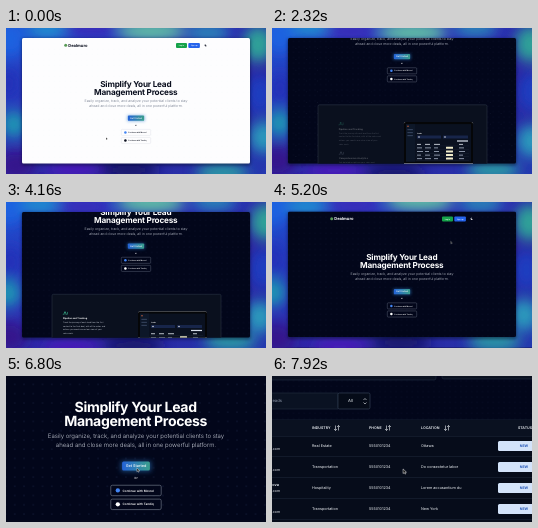
These frames come from a looping animation (260 by 146 pixels, 8 s). An HTML page:

```html
<!DOCTYPE html>
<html lang="en">
<head>
<meta charset="utf-8">
<title>Lead management demo</title>
<style>
html, body { margin: 0; width: 100%; height: 100%; overflow: hidden; background: #15155f; }
svg { display: block; width: 100vw; height: 100vh; font-family: Inter, "Liberation Sans", sans-serif; text-rendering: geometricPrecision; }
#stage { --bg: #fdfdfe; --fg: #0a0f1e; --muted: #677184; --line: #dfe4ec; --card: #f8fafc; --dot: #e3e7ee; --edge: #d5dae2; }
#stage.dark { --bg: #02061a; --fg: #ffffff; --muted: #c6cbd6; --line: #303a4b; --card: #0a101e; --dot: #26335a; --edge: #7d8696; }
</style>
</head>
<body>
<svg id="stage" viewBox="0 0 260 146" preserveAspectRatio="none">
  <defs>
    <linearGradient id="sky" x1="0" y1="0" x2="1" y2="1">
      <stop offset="0" stop-color="#1f4fcf"/>
      <stop offset=".35" stop-color="#2b32b8"/>
      <stop offset=".65" stop-color="#2c249f"/>
      <stop offset="1" stop-color="#2438b0"/>
    </linearGradient>
    <linearGradient id="cta">
      <stop offset="0" stop-color="#2563d8"/>
      <stop offset="1" stop-color="#3a9f8c"/>
    </linearGradient>
    <linearGradient id="metal" x1="0" y1="0" x2="0" y2="1">
      <stop offset="0" stop-color="#f4f5f7"/>
      <stop offset="1" stop-color="#cfd2d8"/>
    </linearGradient>
    <filter id="blur" x="-80%" y="-80%" width="260%" height="260%"><feGaussianBlur stdDeviation="6.5"/></filter>
    <filter id="soft" x="-50%" y="-50%" width="200%" height="200%"><feGaussianBlur stdDeviation="1.5"/></filter>
    <pattern id="dots" x="2.6" y="2" width="5.4" height="5.4" patternUnits="userSpaceOnUse">
      <circle cx="2.7" cy="2.7" r=".28" fill="var(--dot)"/>
    </pattern>
    <pattern id="sparks" x="18.5" y="12" width="10.8" height="10.8" patternUnits="userSpaceOnUse">
      <circle cx="5.4" cy="5.4" r=".5" fill="#7684a0"/>
    </pattern>
    <radialGradient id="fade">
      <stop offset=".2" stop-color="#444"/>
      <stop offset=".85" stop-color="#fff"/>
    </radialGradient>
    <mask id="edges" maskUnits="userSpaceOnUse" x="0" y="0" width="260" height="300">
      <ellipse cx="130" cy="68" rx="190" ry="240" fill="url(#fade)"/>
    </mask>
    <clipPath id="frame"><rect x="16" y="10" width="228" height="125.6" rx="1.5"/></clipPath>
  </defs>
  <g id="camera">
    <rect width="260" height="146" fill="url(#sky)"/>
    <g id="blobs" filter="url(#blur)"></g>
    <rect x="15.5" y="10.5" width="229" height="127" rx="2" fill="#050818" opacity=".45" filter="url(#soft)"/>
    <g clip-path="url(#frame)">
      <rect x="16" y="10" width="228" height="126" fill="var(--bg)"/>
      <g id="home"></g>
      <g id="board" transform="scale(.47619) translate(143 98.8)"></g>
    </g>
    <path id="cursor" d="M0 0V2.2L.55 1.7L.95 2.5L1.3 2.3L.95 1.55H1.65Z" fill="#111" stroke="#fff" stroke-width=".22"/>
  </g>
</svg>
<script>
const NS = 'http://www.w3.org/2000/svg';
const LOOP = 8000;
const $ = id => document.getElementById(id);

function add(parent, tag, attrs, text) {
  const el = document.createElementNS(NS, tag);
  for (const k in attrs) el.setAttribute(k, attrs[k]);
  if (text) el.textContent = text;
  return parent.appendChild(el);
}
const box = (p, x, y, width, height, fill, more) =>
  add(p, 'rect', { x, y, width, height, fill, ...more });
const dot = (p, cx, cy, r, fill) => add(p, 'circle', { cx, cy, r, fill });
const stroke = (p, d, color, width = .4) =>
  add(p, 'path', { d, fill: 'none', stroke: color, 'stroke-width': width });

// y is the middle of the capitals
function label(p, x, y, size, text, fill = 'var(--fg)', weight = 400, anchor = 'start', spacing = 0) {
  return add(p, 'text', {
    x, y: y + size * .36, fill, 'font-size': size, 'font-weight': weight,
    'text-anchor': anchor, 'letter-spacing': spacing
  }, text);
}

function buildBlobs() {
  const list = [
    [4, 8, 16, 18, '#1f62e0'], [38, 2, 20, 9, '#2390d0'], [82, 2, 28, 9, '#3a2cb8'],
    [145, 2, 34, 10, '#62c0a4'], [205, 2, 22, 9, '#2a86b8'], [256, 18, 15, 18, '#2fa298'],
    [4, 58, 12, 16, '#2430b8'], [5, 94, 13, 14, '#1c94b4'], [6, 136, 20, 16, '#35148c'],
    [66, 143, 28, 9, '#4a1cba'], [125, 143, 30, 9, '#191468'], [220, 142, 26, 10, '#2b98a4'],
    [256, 66, 14, 20, '#1e3cc0'], [256, 112, 14, 16, '#2c9abc']
  ];
  return list.map(([cx, cy, rx, ry, fill]) => add($('blobs'), 'ellipse', { cx, cy, rx, ry, fill }));
}

function buildHero(p) {
  dot(p, 59.7, 17.3, 1.5, '#5a9b58');
  label(p, 62.2, 17.3, 4.1, 'Dealmuro', undefined, 700);
  box(p, 170, 14.9, 11, 5, '#16a34a', { rx: 1 });
  label(p, 175.5, 17.4, 1.9, 'Log in', '#fff', 500, 'middle');
  box(p, 182.3, 14.9, 11.6, 5, '#2563eb', { rx: 1 });
  label(p, 188.1, 17.4, 1.9, 'Sign up', '#fff', 500, 'middle');
  add(p, 'path', { d: 'M199.6 16A1.2 1.2 0 1 0 200.9 17.7A1.1 1.1 0 0 1 199.6 16Z', fill: 'var(--fg)' });

  label(p, 129.8, 55.9, 8.2, 'Simplify Your Lead', undefined, 700, 'middle', -.2);
  label(p, 129.8, 64, 8.2, 'Management Process', undefined, 700, 'middle', -.2);
  label(p, 130, 72.6, 3.52, 'Easily organize, track, and analyze your potential clients to stay', 'var(--muted)', 300, 'middle');
  label(p, 130, 77.6, 3.52, 'ahead and close more deals, all in one powerful platform.', 'var(--muted)', 300, 'middle');

  box(p, 121.2, 87.3, 17.6, 6, '#2f7fd0', { opacity: .55, filter: 'url(#soft)' });
  box(p, 121.9, 87.5, 16.2, 5.3, 'url(#cta)', { rx: .9 });
  const cta = label(p, 130, 90.1, 2.2, 'Get Started', '#fff', 500, 'middle');
  label(p, 130, 97, 2.1, 'or', 'var(--fg)', 400, 'middle');
  [['Movrel', '#4285f4', 104.4], ['Tandiq', 'var(--fg)', 112.5]].forEach(([name, color, y]) => {
    box(p, 115.3, y - 3.05, 29.4, 6.1, 'var(--bg)', { rx: .9, stroke: 'var(--edge)', 'stroke-width': .35 });
    dot(p, 119.4, y, 1.25, color);
    label(p, 122.2, y, 1.78, 'Continue with ' + name, undefined, 600);
  });
  return cta;
}

function buildFeature(p, y, color, title, lines) {
  const g = add(p, 'g', {});
  dot(g, 59, y - .5, .9, color);
  stroke(g, `M57.3 ${y + 2}V${y + 1}H60.7V${y + 2}M61.5 ${y - 1}V${y + 1.5}`, color, .6);
  label(g, 57, y + 5.4, 2.3, title, undefined, 700);
  lines.forEach((s, i) => label(g, 57, y + 9.7 + i * 3.6, 1.95, s, 'var(--muted)'));
  return g;
}

function buildComputer(p) {
  add(p, 'path', { d: 'M159 203H173L174.5 209.5H157.5Z', fill: '#a4a8b0' });
  box(p, 154, 209.2, 24, 1.5, '#eceef1', { rx: .6 });
  box(p, 132, 155.5, 69, 49, 'url(#metal)', { rx: 1.6 });
  add(p, 'path', { d: 'M132 196.8V157Q132 155.5 133.5 155.5H199.5Q201 155.5 201 157V196.8Z', fill: '#050608' });
  box(p, 134, 157.7, 65, 37.5, '#0a1120');
  dot(p, 166.5, 200.6, 1.2, '#15171b');
  box(p, 134, 157.7, 9, 37.5, '#0d1728');
  dot(p, 136, 159.8, .7, '#d9683f');
  for (let i = 0; i < 3; i++) box(p, 135.4, 163 + i * 3, 5.5, .7, '#4a5a78');
  label(p, 145, 167, 1.7, 'Leads', '#fff', 700);
  box(p, 145, 169, 24, 3.2, '#17254a', { rx: .4 });
  box(p, 171, 169, 25, 3.2, '#17254a', { rx: .4 });
  dot(p, 147, 170.6, .7, '#fff');
  dot(p, 173, 170.6, .7, '#fff');
  box(p, 185, 174, 11, 1.2, '#d8deea');
  for (let r = 0; r < 5; r++) {
    const y = 177.5 + r * 3.6;
    [145, 153, 162, 187].forEach((x, i) => box(p, x, y, 4 + (r + i) % 3, .8, r ? '#a8b3c6' : '#e6ebf4'));
    if (r) box(p, 174, y - .7, 7, 2, '#f1edcb', { rx: .3 });
    box(p, 144, y + 2, 53, .15, '#36445e');
  }
}

function buildBoard(p) {
  const line = '#1e293b', gray = '#8d97a9', white = '#f1f5f9';
  const rule = y => box(p, -10, y, 290, .5, line);
  box(p, -143, -99, 560, 310, 'var(--bg)');
  box(p, -143, -99, 560, 310, 'url(#dots)');
  box(p, -20, -40, 184, 44, '#0a1120', { rx: 2, stroke: line, 'stroke-width': .7 });
  box(p, 170, -40, 110, 43, '#0a1120', { rx: 2, stroke: line, 'stroke-width': .7 });
  box(p, -20, 17, 86, 16, '#0a1222', { stroke: line, 'stroke-width': .7 });
  box(p, 66, 17, 32, 16, '#050b18', { rx: 1.5, stroke: '#334155', 'stroke-width': .7 });
  label(p, 10, 25, 4.2, 'Search leads', gray, 400, 'end');
  label(p, 76, 25, 4.2, 'All', white);
  stroke(p, 'M91.5 24L93 22.5L94.5 24M91.5 26.5L93 28L94.5 26.5', white, .6);
  box(p, -10, 44, 290, 130, '#060c1a', { stroke: line, 'stroke-width': .7 });
  box(p, -10, 44, 290, 16, '#0a1120');
  [['INDUSTRY', 40, 65], ['PHONE', 97, 116], ['LOCATION', 149, 175], ['STATUS', 246, 266]].forEach(([s, x, ax]) => {
    label(p, x, 52, 3.6, s, white, 600);
    stroke(p, `M${ax - 1.5} 49.5V54.5M${ax - 3} 53L${ax - 1.5} 54.5L${ax} 53M${ax + 1.5} 54.5V49.5M${ax} 51L${ax + 1.5} 49.5L${ax + 3} 51`, white, .6);
  });
  rule(60);
  const rows = [
    ['Real Estate', 'Ottawa', ''], ['Transportation', 'Do consectetur labor', ''],
    ['Hospitality', 'Lorem accusantium du', 'ova'], ['Transportation', 'New York', '']
  ];
  rows.forEach(([industry, place, name], i) => {
    const y = 70 + i * 21;
    if (name) label(p, 7, y - 3, 3.8, name, white, 600, 'end');
    label(p, 8, y + 3, 3.5, 's.com', white, 400, 'end');
    label(p, 40, y, 3.75, industry, white);
    label(p, 97, y, 3.75, '5550101234', white);
    label(p, 149, y, 3.75, place, white);
    box(p, 226, y - 5, 44, 10, '#d3e3fa', { rx: 1.5 });
    label(p, 252, y, 3.5, 'NEW', '#2457b8', 700, 'middle');
    rule(y + 10.5);
  });
}

const home = $('home');
box(home, 16, 10, 228, 240, 'url(#dots)');
const sparks = box(home, 16, 10, 228, 240, 'url(#sparks)', { mask: 'url(#edges)' });
const cta = buildHero(home);
box(home, 46, 138.4, 169, 86, 'var(--card)', { rx: 1.5, stroke: 'var(--line)', 'stroke-width': .5 });
const features = [
  buildFeature(home, 157, '#35a784', 'Pipeline and Tracking', [
    'Track the journey of each lead from the first', 'contact to the final deal, with all the notes and', 'actions you need in one clear view of your', 'sales work.']),
  buildFeature(home, 186.5, '#8a96a8', 'Comprehensive Analytics', [
    'Get detailed insights on your sales and', 'make better decisions with clear charts that', 'show how every lead performs.'])
];
buildComputer(home);
buildBoard($('board'));
const blobs = buildBlobs();

// Smooth path through [time, value] keys
function along(t, keys) {
  if (t <= keys[0][0]) return keys[0][1];
  for (let i = 1; i < keys.length; i++) {
    const [t0, a] = keys[i - 1], [t1, b] = keys[i];
    if (t < t1) {
      const u = (t - t0) / (t1 - t0);
      return a + (b - a) * u * u * (3 - 2 * u);
    }
  }
  return keys[keys.length - 1][1];
}

function draw(t) {
  $('stage').classList.toggle('dark', t >= 1120);

  const zoom = along(t, [[6320, 1], [7120, 2.1]]);
  const k = (zoom - 1) / 1.1;
  const ty = along(t, [[4400, 0], [6000, -1]]) * (1 - k) - 98.8 * k;
  $('camera').setAttribute('transform', `translate(${130 * (1 - zoom)} ${ty}) scale(${zoom})`);

  const scroll = along(t, [[1760, 0], [2720, 98.5], [3400, 98.5], [4860, 0]]);
  home.setAttribute('transform', `translate(0 ${-scroll})`);
  sparks.setAttribute('opacity', along(t, [[1120, 0], [1440, .75], [1800, .75], [2600, 0]]));
  features.forEach((g, i) => {
    const start = 2200 + i * 150;
    const shown = along(t, [[start, 0], [start + 1100, 1]]);
    g.setAttribute('opacity', .3 + .7 * shown);
    g.setAttribute('transform', `translate(${10 * (1 - shown)} 0)`);
  });

  cta.textContent = t >= 7160 ? 'Loading...' : 'Get Started';
  $('board').style.display = t >= 7640 ? '' : 'none';

  const x = along(t, [[160, 100], [960, 199.5], [4800, 199.5], [5900, 130.5]]);
  const y = along(t, [[160, 109.5], [960, 17.5], [4800, 17.5], [5900, 91.3]]);
  $('cursor').setAttribute('transform', `translate(${x} ${y})`);
  $('cursor').setAttribute('opacity', along(t, [[1600, 1], [1760, 0], [4800, 0], [4960, 1]]));

  blobs.forEach((b, i) => {
    const a = t / LOOP * Math.PI * 2;
    b.setAttribute('transform', `translate(${4 * Math.sin(a + i)} ${3 * Math.cos(a + i * 1.7)})`);
  });
}

function tick() {
  draw(performance.now() % LOOP);
  requestAnimationFrame(tick);
}
tick();
</script>
</body>
</html>
```
